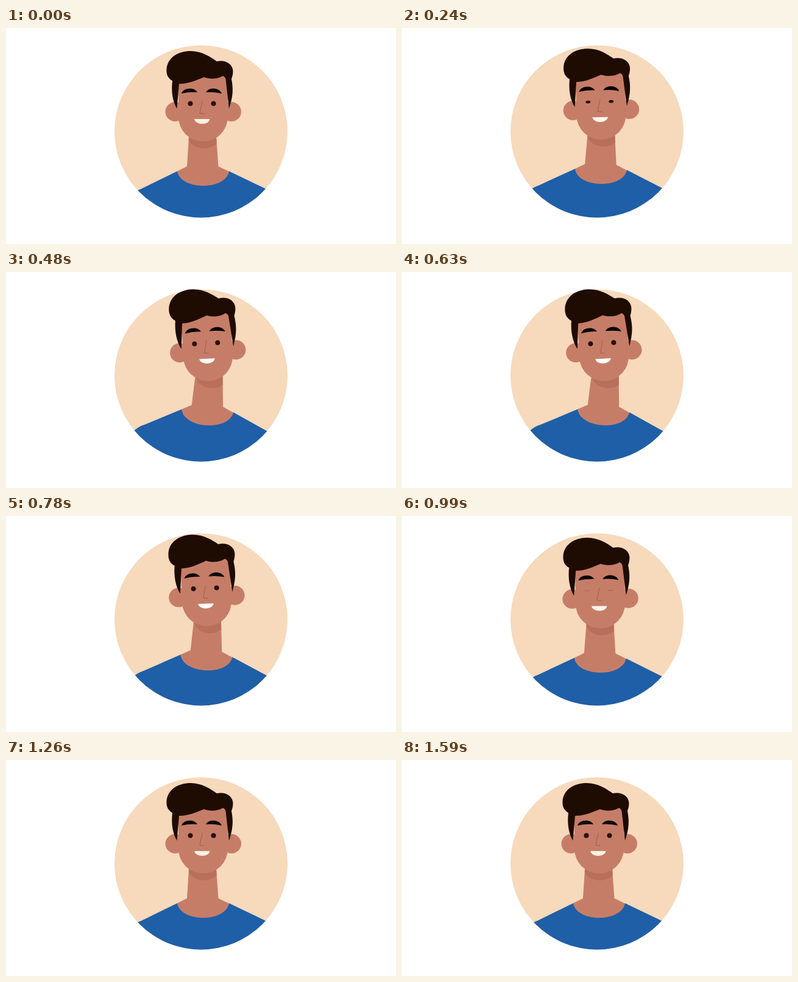
Animation, 640 px wide and 356 px high, one loop 1620 ms. Source, as an HTML page:

```html
<!DOCTYPE html>
<html lang="en">
<head>
<meta charset="utf-8">
<title>Friendly avatar</title>
<style>
  html, body { margin: 0; width: 100%; height: 100%; overflow: hidden; background: #fff; }
  svg { display: block; width: 100%; height: 100%; }
</style>
</head>
<body>
<svg viewBox="0 0 640 356">
  <defs>
    <clipPath id="disc"><circle cx="320" cy="170.5" r="142"/></clipPath>
    <clipPath id="throat"><path d="M301 165H344L348.5 228L366 236.5V275H281V236L297 228Z"/></clipPath>
  </defs>
  <circle cx="320" cy="170.5" r="142" fill="#f7d9bc"/>
  <g clip-path="url(#disc)">
    <g id="body">
      <g clip-path="url(#throat)">
        <rect x="275" y="160" width="100" height="120" fill="#c67d68"/>
        <ellipse id="shade" cx="324.5" cy="176" rx="27" ry="22.5" fill="#b8705c"/>
      </g>
      <path fill="#1f5fa7" d="M190 295Q206 270 222 265L281 236C286 268 361 268 366 236L480 291V350H180Z"/>
    </g>
  </g>
  <g id="head">
    <g fill="#c67d68">
      <circle cx="277.5" cy="138" r="16"/>
      <circle cx="370" cy="138" r="16"/>
      <path d="M283 75V146.5a40.5 40.5 0 0 0 81 0V75Z"/>
    </g>
    <path id="hair" fill="#1e0c03" d="M280.5 133C273 120 271 104 273 87C266 83 263 77 263.5 68C265 48 283 38 303 38C322 38 336 48 346 55C358 52 372 58 372.5 71C372.5 77 371 81 370 84C373 100 373 112 366 133L360.5 84Q359 80 356 79C346 85 332 84 325 81C312 86 300 92 284 92C283 105 281.5 120 280.5 133Z"/>
    <g id="brows" fill="#0d0504">
      <path d="M288 108C291 98 309 97 314 106Q300 105 288 108Z"/>
      <path d="M328 106C333 97 350 98 354 108Q341 105 328 106Z"/>
    </g>
    <g stroke="#a55d4a" fill="none">
      <path id="lids" stroke-width=".8" d="M298.5 124.5q4 .8 8 0m30 0q4 .8 8 0"/>
      <path d="M322.3 120L318 140.5L325.5 141.3"/>
    </g>
    <g fill="#2b0f09">
      <ellipse class="eye" cx="302.5" cy="124.5" rx="4"/>
      <ellipse class="eye" cx="340.5" cy="124.5" rx="4"/>
    </g>
    <path id="mouth" d="M309 150H334.5C333 160.5 311 160.5 309 150Z"/>
  </g>
</svg>
<script>
const LOOP = 1620, PEAK = 555, REST = 1195;
const BLINKS = [175, 990];
const $ = id => document.getElementById(id);
const eyes = document.querySelectorAll('.eye');

const clamp = u => Math.min(1, Math.max(0, u));
const ease = u => (1 - Math.cos(Math.PI * clamp(u))) / 2;
const mix = (a, b, k) => a + (b - a) * k;
const move = (id, value) => $(id).setAttribute('transform', value);

// k runs from 0 (upright) to 1 (full lean).
function pose(k) {
  move('body', `translate(${7.5 * k} ${-7.6 * k}) rotate(${3.6 * k} 323 236)`);
  move('shade', `translate(${2.5 * k} 0)`);
  move('head', `translate(${7.1 * k} ${-7.5 * k}) rotate(${-3.1 * k} 323 124)`);
  // The hair stretches upward from the sideburn tips.
  move('hair', `translate(0 ${133 - 1.2 * k}) scale(1 ${1 + .025 * k}) translate(0 -133)`);
  move('brows', `translate(0 ${-1.2 * k})`);
  $('mouth').setAttribute('fill',
    `rgb(${mix(252, 255, k)},${mix(240, 255, k)},${mix(228, 255, k)})`);
}

function blink(t) {
  const gap = Math.min(...BLINKS.map(b => Math.abs(t - b)));
  const open = clamp((gap - 12) / 95);
  eyes.forEach(e => e.setAttribute('ry', 4 * open));
  $('lids').setAttribute('opacity', open < .2 ? 1 : 0);
}

function draw(t) {
  pose(t < PEAK ? ease(t / PEAK) : 1 - ease((t - PEAK) / (REST - PEAK)));
  blink(t);
}

const start = performance.now();
function tick() {
  draw((performance.now() - start) % LOOP);
  requestAnimationFrame(tick);
}
tick();
</script>
</body>
</html>
```
